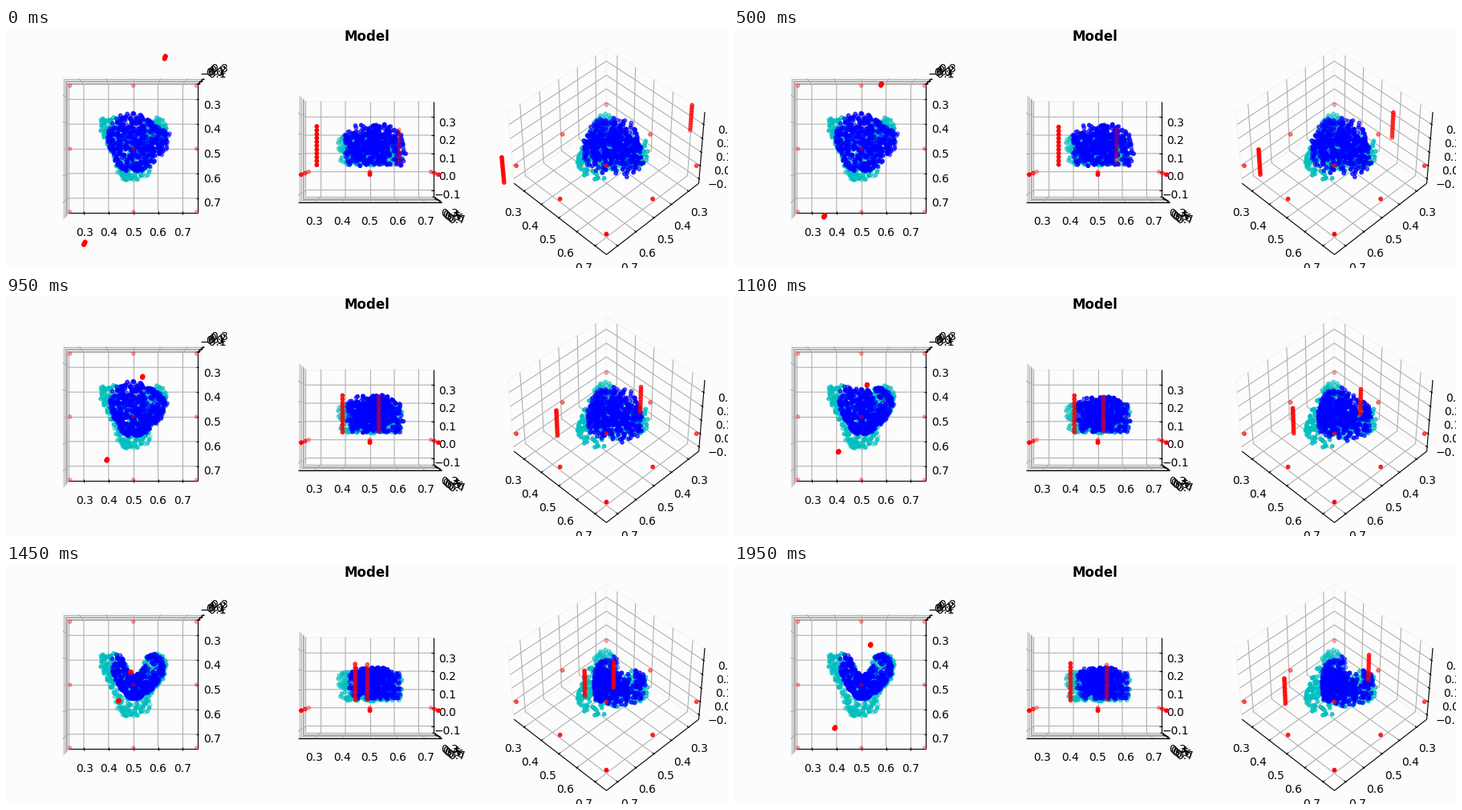
These frames come from a looping animation (900x300 px, 2000 ms). A matplotlib script:

```python
import numpy as np
import matplotlib.pyplot as plt
from matplotlib.animation import FuncAnimation
from matplotlib.collections import LineCollection

FRAMES, STEP = 40, 50
SCALE = 1411                            # pixels per unit of projected plane
PX = 322                                # pixels per data unit, seen from above
MID = np.array([0.5, 0.5, 0.1257])      # centre of the data box
WORLD = np.array([16, -16, 12]) / 7     # data to world, y axis inverted
LO, HI = MID - 0.25 * 25 / 24, MID + 0.25 * 25 / 24
PAD = 0.0614                            # tick label offset
VIEWS = [(158.7, 90, -90), (453.55, 0, -90), (748.4, 45, -45)]
CY = 151
TICKS = [(0.3, 0.4, 0.5, 0.6, 0.7)] * 2 + [(-0.1, 0.0, 0.1, 0.2, 0.3)]


def project(pts, view):
    """Perspective view: pixel positions and closeness to the eye."""
    cx, elev, azim = view
    e, a = np.radians([elev, azim])
    near = np.array([np.cos(e) * np.cos(a), np.cos(e) * np.sin(a), np.sin(e)])
    right = np.array([-np.sin(a), np.cos(a), 0])
    up = np.array([-np.sin(e) * np.cos(a), -np.sin(e) * np.sin(a), np.cos(e)])
    w = (np.asarray(pts, float) - MID) * WORLD
    depth = w @ near
    k = SCALE / (10 - depth)
    return np.column_stack([cx + k * (w @ right), CY - k * (w @ up)]), depth


def shaded(pts, rgb):
    """Points in all views, far to near, fading with distance."""
    spots, colors = [], []
    for view in VIEWS:
        xy, depth = project(pts, view)
        order = np.argsort(depth)
        alpha = 0.3 + 0.7 * (depth - depth.min()) / np.ptp(depth)
        rgba = np.tile((*rgb, 1.0), (len(pts), 1))
        rgba[:, 3] = alpha
        spots.append(xy[order])
        colors.append(rgba[order])
    return np.vstack(spots), np.vstack(colors)


# ---- axes boxes ----
fig = plt.figure(figsize=(9, 3), dpi=100, facecolor="#fcfcfc")
ax = fig.add_axes([0, 0, 1, 1])
ax.set_xlim(0, 900)
ax.set_ylim(300, 0)
ax.axis("off")


def corner(base, **change):
    p = np.array(base, float)
    for name, value in change.items():
        p["xyz".index(name)] = value
    return p


def draw_box(view):
    xl, yl, zl = LO
    xh, yh, zh = HI
    panes = [
        [(xl, yl, zl), (xl, yh, zl), (xl, yh, zh), (xl, yl, zh), (xl, yl, zl)],
        [(xl, yl, zl), (xh, yl, zl), (xh, yl, zh), (xl, yl, zh), (xl, yl, zl)],
        [(xl, yl, zl), (xh, yl, zl), (xh, yh, zl), (xl, yh, zl), (xl, yl, zl)],
    ]
    grids = [
        [(0, yh, zl), (0, yl, zl), (0, yl, zh)],
        [(xh, 0, zl), (xl, 0, zl), (xl, 0, zh)],
        [(xh, yl, 0), (xl, yl, 0), (xl, yh, 0)],
    ]
    spines = [
        [(xl, yh, zl), (xh, yh, zl)],
        [(xh, yl, zl), (xh, yh, zl)],
        [(xh, yl, zl), (xh, yl, zh)],
    ]
    labels = [(0, yh + PAD, zl - PAD), (xh + PAD, 0, zl - PAD),
              (xh + PAD, yl - PAD, 0)]
    grid, black = [], [project(s, view)[0] for s in spines]
    for i, axis in enumerate("xyz"):
        side = "y" if axis == "x" else "x"
        edge = yh if axis == "x" else xh
        for v in TICKS[i]:
            grid.append(project([corner(p, **{axis: v}) for p in grids[i]],
                                view)[0])
            base = corner(spines[i][0], **{axis: v})
            tick = [corner(base, **{side: edge + d})
                    for d in (0.0042, -0.0083)]
            black.append(project(tick, view)[0])
            x, y = project([corner(labels[i], **{axis: v})], view)[0][0]
            ax.text(x, y, f"{v:.1f}".replace("-", "\u2212"), fontsize=10,
                    ha="center", va="top", zorder=3)
    outline = [project(p, view)[0] for p in panes]
    for lines, color, width, z in ((outline, "#f4f4f4", 1, 0),
                                   (grid, "#b0b0b0", 0.8, 1),
                                   (black, "black", 0.8, 2)):
        ax.add_collection(LineCollection(lines, colors=color,
                                         linewidths=width, zorder=z))


for view in VIEWS:
    draw_box(view)
ax.text(450, 15.6, "Model", fontsize=12, weight="bold", ha="center")

# ---- clay: outlines as radius over angle around one centre ----
CLAY = (0.504, 0.539)
ANGLE = [0, 20, 35, 50, 62, 71, 75, 90, 105, 109, 120, 130, 145, 165, 180,
         215, 250, 290, 325]
BEFORE = [29, 45, 55, 50, 49, 53, 54, 57, 58, 57, 53, 50, 41, 29, 25,
          21, 16, 16, 19]
AFTER = [11, 26, 45, 57, 58, 52, 29, 23, 31, 55, 55, 44, 26, 13, 10,
         7, 5, 5, 7]
GOAL_ANGLE = [0, 20, 35, 45, 55, 65, 72, 78, 90, 102, 108, 118, 128, 138, 150,
              165, 180, 200, 225, 250, 270, 290, 315, 340]
GOAL = [22, 33, 47, 58, 61, 57, 52, 26, 21, 26, 50, 60, 66, 58, 40,
        30, 25, 25, 29, 29, 29, 29, 27, 23]

rng = np.random.default_rng(4)


def fill(angles, radii, count):
    """Random scatter inside an outline: angle, radius share, height share."""
    x, y = rng.uniform(-66, 66, (2, 4000))
    theta = np.degrees(np.arctan2(y, x)) % 360
    share = np.hypot(x, y) / np.interp(theta, angles, radii, period=360)
    keep = np.flatnonzero(share < 1)[:count]
    return theta[keep], share[keep], rng.random(len(keep))


def place(theta, radius, z):
    t = np.radians(theta)
    return np.column_stack([CLAY[0] + radius * np.cos(t) / PX,
                            CLAY[1] - radius * np.sin(t) / PX, z])


theta, share, level = fill(ANGLE, BEFORE, 520)
r0 = share * np.interp(theta, ANGLE, BEFORE, period=360)
r1 = share * np.interp(theta, ANGLE, AFTER, period=360)
z0 = (0.042 + level * (0.212 - 0.06 * share**3)
      + rng.normal(0, 0.004, len(level)))
z1 = 0.054 + level * (0.162 - 0.03 * share**4)
in_dent = np.abs(theta - 90) < 17

g_theta, g_share, g_level = fill(GOAL_ANGLE, GOAL, 420)
goal = place(g_theta,
             g_share * np.interp(g_theta, GOAL_ANGLE, GOAL, period=360),
             0.042 + g_level * (0.165 - 0.03 * g_share**3))

floor = np.array([(x, y, 0) for x in (0.25, 0.5, 0.75)
                  for y in (0.25, 0.5, 0.75)])
rod = np.linspace(0.0495, 0.2315, 11)


def clay(k):
    squeeze = np.clip((k - 14) / 13, 0, 1)
    dent = np.clip((k - 19) / 10, 0, 1)
    s = np.where(in_dent, dent, squeeze)
    return place(theta, r0 + (r1 - r0) * s, z0 + (z1 - z0) * squeeze)


def tools(k):
    """Two rods close in until step 29, then open again."""
    n = 29 - abs(29 - k)
    dx, dy = -0.00455 * n, 0.01045 * n
    ends = [(0.622 + dx, 0.1475 + dy), (0.312 - dx, 0.865 - dy)]
    rods = [np.column_stack([np.full(11, x), np.full(11, y), rod])
            for x, y in ends]
    return np.vstack([floor, *rods])


def dots(pts, rgb, z):
    xy, colors = shaded(pts, rgb)
    return ax.scatter(*xy.T, s=10, c=colors, linewidths=1, zorder=z)


CYAN, BLUE, RED = (0, 0.75, 0.75), (0, 0, 1), (1, 0, 0)
dots(goal, CYAN, 4)
blue = dots(clay(0), BLUE, 5)
red = dots(tools(0), RED, 6)


def draw(k):
    for art, pts, rgb in ((blue, clay(k), BLUE), (red, tools(k), RED)):
        xy, colors = shaded(pts, rgb)
        art.set_offsets(xy)
        art.set_facecolor(colors)
        art.set_edgecolor(colors)
    return blue, red


anim = FuncAnimation(fig, draw, frames=FRAMES, interval=STEP, repeat=True)
plt.show()
```
